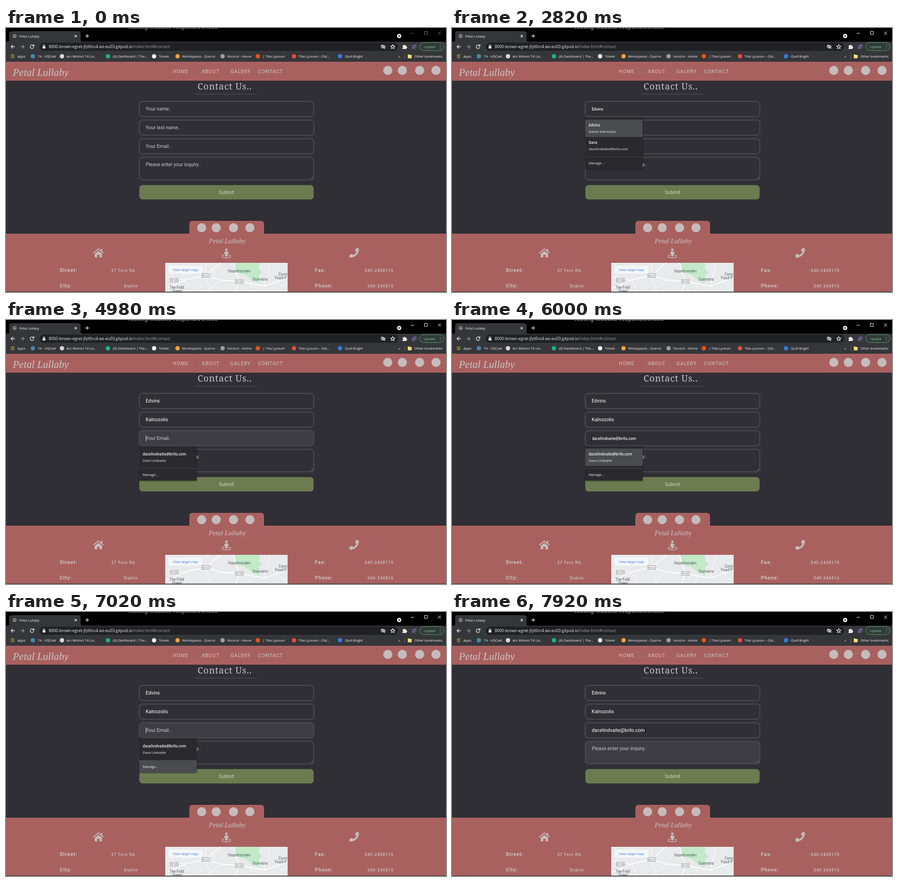
Animation, 967 px wide and 579 px high, one loop 8 s. Source, as an HTML page:

```html
<!DOCTYPE html>
<html lang="en">
<head>
<meta charset="utf-8">
<title>Contact form</title>
<style>
  html, body { margin: 0; width: 100%; height: 100%; overflow: hidden; background: #000; }
  svg { display: block; width: 967px; height: 579px; }
  text { white-space: pre; }
  .ui { font: 500 7.5px "Open Sans", "Noto Sans", sans-serif; fill: #f1f2f4; }
  .strong { font-size: 8px; font-weight: 600; fill: #fff; }
  .page { font: 10.67px Roboto, sans-serif; fill: #c9c8cc; }
  .filled { fill: #fff; }
  .preview { font: 600 8.2px "Open Sans", sans-serif; fill: #fff; }
  .nav { letter-spacing: 1px; text-anchor: middle; fill: #cdc5c5; }
  .label { font-weight: 700; letter-spacing: 1px; fill: #cdc5c5; }
  .value { font-size: 8.7px; font-weight: 500; letter-spacing: 1px; text-anchor: end; fill: #cdc5c5; }
  .script { font: italic 22.7px "Liberation Serif", serif; fill: #cdc5c5; }
  .map { font: 8.3px Roboto, sans-serif; fill: #55595e; }
  .road { font: 6px Roboto, sans-serif; fill: #444; text-anchor: middle; }
  .line { fill: none; stroke: #e8eaed; stroke-width: 1.3; }
  .rule { stroke: #a05d5d; stroke-width: 1; }
</style>
</head>
<body>
<svg viewBox="0 0 967 579">
  <defs>
    <linearGradient id="avatar" x2="1" y2="1">
      <stop offset="0" stop-color="#27264c"/><stop offset=".5" stop-color="#6d5f86"/><stop offset="1" stop-color="#2a2433"/>
    </linearGradient>
    <clipPath id="mapClip"><rect x="350" y="515" width="269" height="63"/></clipPath>
    <filter id="shadow" x="-10%" y="-10%" width="120%" height="125%">
      <feDropShadow dx="0" dy="1" stdDeviation="1.5" flood-opacity=".55"/>
    </filter>
  </defs>

  <!-- browser chrome -->
  <rect width="967" height="579"/>
  <text x="267" y="2" font-family="Liberation Sans, sans-serif" font-size="13" font-weight="700" fill="#777">Testing website responsiveness</text>
  <path d="M3 30q4 0 4-4V13q0-6 6-6H158q6 0 6 6V26q0 4 4 4H967V74H0V30z" fill="#35363a"/>
  <circle cx="19" cy="17.500" r="4.500" fill="#85888c"/>
  <path d="M15.500 16l3 1 1 3M19 13.500l1 2.500 3 .5" fill="none" stroke="#3a3b3f"/>
  <text class="ui" x="29" y="20.500">Petal Lullaby</text>
  <path class="line" d="M151 15.500l4.500 4.500m0-4.500L151 20M174.500 17.500h8m-4-4v8"/>
  <circle cx="864" cy="17.500" r="4.800" fill="#e8eaed"/><path d="M861.500 16.500h5l-2.500 3z"/>
  <path id="controls" fill="none" d="M889.500 11.500h7M919.500 7.500h6.500v6.500h-6.500zM949.500 8l6.500 6.500m0-6.500l-6.500 6.500"/>
  <rect x="74" y="32" width="788" height="18" rx="9" fill="#202124"/>
  <path class="line" d="M19.500 41H11m4-4l-4 4 4 4"/>
  <path class="line" d="M31.500 41H40m-4-4l4 4-4 4" stroke-opacity=".5"/>
  <path class="line" d="M60.500 38.500a4 4 0 1 0 .6 3.500M61.500 36v3.500H58"/>
  <rect x="80.500" y="40" width="6" height="5" rx=".6" fill="#e8eaed"/>
  <path class="line" d="M81.800 40v-1.200a1.700 1.700 0 0 1 3.400 0V40" stroke-width="1"/>
  <text class="ui" x="94" y="44" style="font-size:8.8px;font-weight:400">8000-brown-egret-jfyt0nc4.ws-eu03.gitpod.io<tspan fill="#9aa0a6">/index.html#contact</tspan></text>
  <path class="line" d="M824 41q4.800-6 9.600 0-4.800 6-9.600 0M825 36.500l8 9" stroke-width="1.100"/><circle cx="828.800" cy="41" r="1.500" fill="#e8eaed"/>
  <path class="line" d="M850 36.500l1.300 3 3.200.3-2.400 2.200.7 3.200-2.800-1.700-2.800 1.700.7-3.200-2.400-2.200 3.200-.3z" stroke-width="1"/>
  <path d="M871.500 38.500h2.500a1.700 1.700 0 0 1 3.400 0h2.600v2.600a1.700 1.700 0 0 1 0 3.400V46h-8.500v-2.500a1.600 1.600 0 0 0 0-3z" fill="#e8eaed"/>
  <circle cx="897" cy="41" r="6" fill="url(#avatar)"/>
  <rect x="909.500" y="32" width="53" height="17.500" rx="8.750" fill="#303a37" stroke="#5da273"/>
  <text class="ui" x="918" y="43.800" style="fill:#81c995">Update</text>
  <path d="M954.500 37.500h0m0 3.500h0m0 3.500h0" stroke="#81c995" stroke-width="1.700" stroke-linecap="round"/>
  <g id="bookmarks"></g>
  <path d="M876.500 56v12" stroke="#606367"/>
  <path d="M883 58h3.500l1 1h4v7.500H883z" fill="#f9dc7c"/>

  <!-- page -->
  <rect y="74" width="967" height="504" fill="#302f35"/>
  <rect y="74" width="967" height="41.500" fill="#a96160"/>
  <text class="script" x="15" y="105">Petal Lullaby</text>
  <path class="rule" d="M8 108.500H144M825 108.500H960"/>
  <g id="nav"></g>
  <text x="421" y="134.500" font-family="Noto Serif, serif" font-size="19.500" font-weight="500" letter-spacing="1" fill="#c9c8cc">Contact Us..</text>
  <path d="M415 145h139" stroke="#56555b"/>
  <g id="fields"></g>
  <path d="M670.500 330.500l4-4m-1.500 4l1.500-1.500" stroke="#99989d" stroke-width=".8"/>
  <rect x="293" y="344.500" width="383" height="31.500" rx="7" fill="#6d7b51"/>
  <text class="page" x="484.500" y="363.500" text-anchor="middle" style="fill:#d0d3c8">Submit</text>

  <!-- footer -->
  <path d="M0 451H403V430q0-7 7-7H560q7 0 7 7V451H967V578H0z" fill="#a96160"/>
  <g id="badges" fill="#c4bcbc"></g>
  <text class="script" x="486" y="472" text-anchor="middle" style="font-size:15px">Petal Lullaby</text>
  <g fill="#c4bcbc">
    <path d="M195 495.300l8-6.600 8 6.600v7.700h-5.500v-5.500h-5v5.500H195zM208.500 484.500h3v6h-3z"/>
    <path d="M191.800 493.700L203 484.500l11.200 9.200" fill="none" stroke="#c4bcbc" stroke-width="2"/>
    <circle cx="484.300" cy="486.300" r="2.700"/>
    <path d="M482 490h4.600q2 0 2 2v4h-1.600v5h-5.400v-5H480v-4q0-2 2-2z"/>
    <path d="M479.500 497.500c-8 2.500-5 6.500 4.800 6.500s12.800-4 4.800-6.500" fill="none" stroke="#c4bcbc" stroke-width="1.500"/>
    <path transform="translate(754.500 482.500) scale(.0413)" d="M493.400 24.600l-104-24c-11.300-2.600-22.900 3.300-27.500 13.900l-48 112c-4.200 9.800-1.400 21.300 6.900 28l60.600 49.600c-36 76.700-98.900 140.500-177.200 177.200l-49.600-60.600c-6.800-8.300-18.200-11.100-28-6.900l-112 48C3.900 366.500-2 378.100.6 389.400l24 104C27.100 504.200 36.700 512 48 512c256.100 0 464-207.500 464-464 0-11.200-7.700-20.900-18.600-23.400z"/>
  </g>
  <path class="rule" d="M80 515.500H330M70 548.500H300M640 515.500H890M670 548.500H900"/>
  <g id="details"></g>
  <g clip-path="url(#mapClip)">
    <rect x="350" y="515" width="269" height="63" fill="#e8eaec"/>
    <path d="M503 515h54l-1 14 8 7-8 6 1 18-15-6-15-12-17-5-6-9z" fill="#c3e9c9"/>
    <g fill="none" stroke="#fff">
      <path stroke-width="1.800" d="M350 572l50-21 39-8 32-28M439 543l34 10 40 3 55 10 51-18M513 556l-8 22M500 515l6 22 7 19"/>
      <path stroke-width="1" d="M350 545l45 8 12 25M440 515l-2 28 12 35M471 553l-30 25M568 566l12-51M580 540l39 38M540 562l-6 16"/>
    </g>
    <rect x="357" y="521" width="75" height="18" fill="#f4f5f6"/>
    <text class="map" x="366.500" y="533" style="font-size:7.7px;fill:#4285f4">View larger map</text>
    <g fill="#fff" stroke="#777" stroke-width=".8">
      <rect x="430.500" y="538.500" width="17" height="8"/><rect x="361.500" y="549" width="17" height="8"/><rect x="504.500" y="552" width="17" height="8"/>
    </g>
    <text class="road" x="439" y="544.700">R121</text><text class="road" x="370" y="555.200">R135</text><text class="road" x="513" y="558.200">R122</text>
    <text class="map" x="488" y="535.500">Hazelmorden</text><text class="map" x="542" y="554">Dunvarra</text>
    <text class="map" x="599" y="542.500">Corvi</text><text class="map" x="591" y="551">Food P</text>
    <text class="map" x="359" y="572">The Fold</text><text class="map" x="365" y="580">Green</text>
  </g>
  <path d="M0 578.500H967" stroke="#35363a"/>

  <path id="caret" fill="none" stroke-width="1"/>
  <g id="nameMenu"></g>
  <g id="emailMenu"></g>
</svg>
<script>
const $ = id => document.getElementById(id);
const text = (cls, x, y, s) => `<text class="${cls}" x="${x}" y="${y}">${s}</text>`;
const show = (el, on) => el.style.display = on ? '' : 'none';
const dot = (x, y, r, fill) => `<circle cx="${x}" cy="${y}" r="${r}"${fill ? ` fill="${fill}"` : ''}/>`;

const person = { first: 'Edvins', last: 'Kalnozolis' };
const email = 'dacelindvaite@brilo.com';

$('bookmarks').innerHTML = [
  [59, '#4b86a8', 70, 'T4 - VQCast'], [123, '#d8d8dc', 133, 'Arc Motors T4 Liv...'],
  [224, '#1fb57a', 235, '(6) Dashboard | The...'], [325.5, '#f2f2f2', 336, 'Tolvek'],
  [377, '#f2a33a', 387, 'Workspaces - Quirno'], [476, '#9b9da1', 486, 'Vond.el - Home'],
  [553.5, '#e8501e', 564, '| Tilia Lyceum'], [633, '#e0503c', 643, 'Tilia Lyceum – Ost...'],
  [734, '#2f7de0', 745, 'Quill Bright']
].map(([cx, fill, x, s]) => dot(cx, 62, 4.8, fill) + text('ui', x, 65, s)).join('')
  + [...Array(9).keys()].map(i =>
      `<rect x="${10.5 + i % 3 * 3}" y="${58 + (i / 3 | 0) * 3}" width="2" height="2" fill="${['#e8574a', '#f0b73c', '#4fa96a'][i % 3]}"/>`).join('')
  + text('ui', 25, 65, 'Apps') + text('ui', 862.5, 65, '»') + text('ui', 897.5, 65, 'Other bookmarks');

$('nav').innerHTML = ['HOME', 'ABOUT', 'GALERY', 'CONTACT'].map((s, i) =>
  `<rect x="${352.5 + i * 65.8}" y="82.5" width="62" height="25.500" rx="7" fill="none" class="rule"/>`
  + text('page nav', 384 + i * 65.8, 99, s)).join('');

$('badges').innerHTML = [839, 871, 909, 945].map(x => dot(x, 93, 10)).join('')
  + [430, 462, 500, 536].map(x => dot(x, 438, 10)).join('');

$('details').innerHTML = [
  [118, 289, 535, 'Street:', '27 Fern Rd..'], [118, 289, 569, 'City:', 'Dublin'],
  [679, 851, 535, 'Fax:', '040-246817S'], [679, 851, 569, 'Phone:', '040-246816']
].map(([x, end, y, k, v]) => text('page label', x, y, k) + text('page value', end + 1, y - .5, v)).join('');

const hints = ['Your name..', 'Your last name..', 'Your Email..', 'Please enter your inquiry..'];
const fieldY = i => 161.5 + i * 40.8;
$('fields').innerHTML = hints.map((s, i) => {
  const box = `x="293.5" y="${fieldY(i)}" width="382.500" height="${i < 3 ? 32.5 : 48.5}" rx="7"`;
  return `<rect ${box} fill="none" stroke="#fff" stroke-opacity=".05" stroke-width="5"/>`
    + `<rect class="box" ${box} stroke="#57565c"/>` + text('page', 307, fieldY(i) + 19.5, s);
}).join('');
const boxes = document.querySelectorAll('.box');
const entries = document.querySelectorAll('.box + text');

// Autofill menu: rows 38px high, then a rule and the "Manage..." row.
function buildMenu(el, top, rows) {
  const rule = top + 10 + rows.length * 38;
  const bar = (y, h) => `<rect class="bar" x="293" y="${y}" width="126" height="${h}" fill="#4a4b4f"/>`;
  el.innerHTML = `<rect x="293" y="${top}" width="126" height="${rule + 27 - top}" fill="#292a2d" filter="url(#shadow)"/>`
    + `<path d="M293 ${rule + .5}h126" stroke="#3f4145"/>` + bar(top + 5, 38) + bar(rule, 27)
    + rows.map(([main, sub], i) => text('ui strong', 300.5, top + 20 + i * 38, main)
      + text('ui', 300.5, top + 34 + i * 38, sub)).join('')
    + text('ui', 300.5, rule + 17, 'Manage...');
}
buildMenu($('nameMenu'), 196, [[person.first, `${person.first} ${person.last}`], ['Dace', email]]);
buildMenu($('emailMenu'), 277, [[email, 'Dace Lindvaite']]);

function highlight(menu, row, manage) {
  const [first, last] = menu.querySelectorAll('.bar');
  show(first, row);
  show(last, manage);
}

function setEntry(i, mode, value) {
  const el = entries[i];
  el.setAttribute('class', mode === 'hint' ? 'page' : mode === 'filled' ? 'page filled' : 'preview');
  el.textContent = mode === 'hint' ? hints[i] : value;
}

// [on, off, field, after text]
const carets = [
  [1860, 2400, 0], [2880, 3420, 0], [3720, 4200, 0, true], [4680, 4980, 0, true],
  [4980, 5520, 2], [6000, 6480, 2], [7020, 7500, 2], [7860, 8000, 2, true]
];

function draw(t) {
  const within = (a, b) => t >= a && t < b;
  const rowPreview = within(5460, 6420) || within(7320, 7860);
  const modes = [
    t < 2820 ? 'hint' : t < 3720 ? 'preview' : 'filled',
    t < 3720 ? 'hint' : 'filled',
    rowPreview ? 'preview' : t < 7860 ? 'hint' : 'filled'
  ];
  [person.first, person.last, email].forEach((value, i) => setEntry(i, modes[i], value));

  const lit = [within(1080, 2820), false, within(4680, 7860) && !rowPreview, t >= 7920];
  boxes.forEach((box, i) => box.setAttribute('fill', lit[i] ? '#3e3d43' : '#302f35'));

  $('controls').setAttribute('stroke', t < 1860 ? '#77797c' : '#fff');
  show($('nameMenu'), within(1920, 3720));
  show($('emailMenu'), within(4980, 7860));
  highlight($('nameMenu'), t >= 2820, false);
  highlight($('emailMenu'), rowPreview, within(6480, 7320));

  const caret = carets.find(([on, off]) => within(on, off));
  show($('caret'), caret);
  if (caret) {
    const [, , i, after] = caret;
    const x = after ? Math.round(307 + entries[i].getComputedTextLength()) + .5 : 307.5;
    $('caret').setAttribute('d', `M${x} ${Math.round(fieldY(i) + 9.5)}v13`);
    $('caret').setAttribute('stroke', modes[i] === 'hint' ? '#d8d8dc' : '#000');
  }
}

const start = performance.now();
(function tick() {
  draw((performance.now() - start) % 8000);
  requestAnimationFrame(tick);
})();
</script>
</body>
</html>
```
